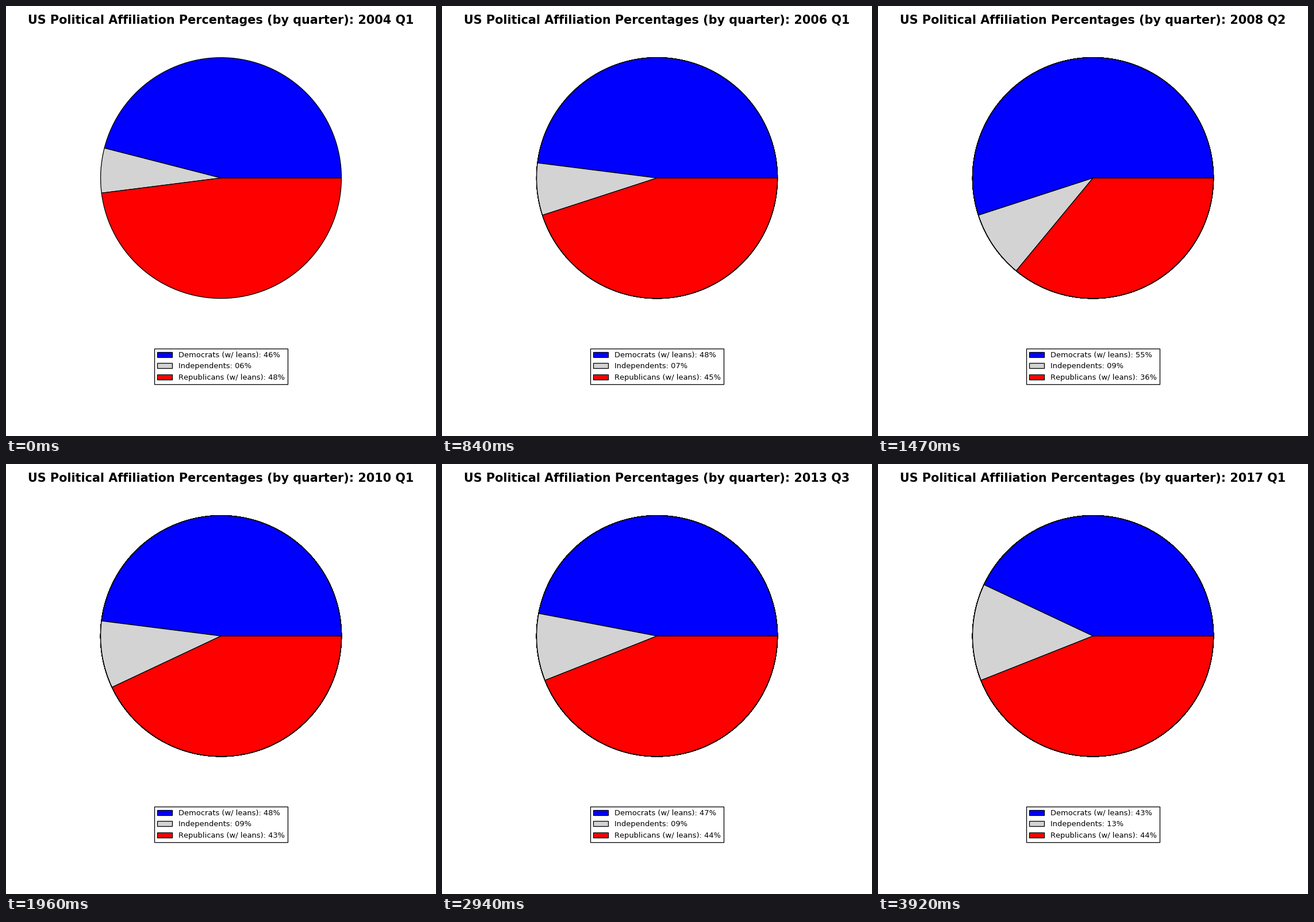
A matplotlib script that plays this animation: 748 px wide and 748 px high, repeating every 4.34 s.

```python
import numpy as np
import matplotlib.pyplot as plt
from matplotlib.animation import FuncAnimation
from matplotlib.patches import Patch

plt.rcParams["font.family"] = "DejaVu Sans"
plt.rcParams["text.kerning_factor"] = 6   # whole-pixel kerning

STEP_MS = 70
STEPS = 62
HOLD = 4         # extra steps spent on the first quarter
QUARTERS = 53
START_YEAR = 2004
COLORS = ["blue", "lightgray", "red"]
NAMES = ["Democrats (w/ leans)", "Independents", "Republicans (w/ leans)"]

# Turning points of the two large shares: quarter -> percent
TURNS = [0, 8, 11, 17, 21, 24, 31, 35, 44, 51, 52]
DEM = [46, 48, 53, 55, 53, 48, 43, 49, 43, 49, 43]
REP = [48, 45, 38, 36, 36, 43, 45, 44, 44, 42, 44]


def split(quarter):
    dem = round(np.interp(quarter, TURNS, DEM))
    rep = round(np.interp(quarter, TURNS, REP))
    return dem, 100 - dem - rep, rep


def labels(quarter):
    return [f"{name}: {share:02d}%"
            for name, share in zip(NAMES, split(quarter))]


def heading(quarter):
    year, part = START_YEAR + quarter // 4, quarter % 4 + 1
    return f"US Political Affiliation Percentages (by quarter): {year} Q{part}"


fig = plt.figure(figsize=(8, 8), dpi=93.5, facecolor="white")
ax = fig.add_axes([0.15, 0.25, 0.7, 0.7])
title = fig.suptitle(heading(0), fontsize=16, fontweight="bold")

# Each pie stays beneath the next one, so the rim slowly thickens.
edge = {"edgecolor": "black", "linewidth": 1}
pies = [ax.pie(split(q), colors=COLORS, wedgeprops=edge)[0]
        for q in range(QUARTERS)]

handles = [Patch(facecolor=color, label=label, **edge)
           for color, label in zip(COLORS, labels(0))]
legend = ax.legend(handles=handles, loc="lower center",
                   bbox_to_anchor=(0.5, -0.198), fontsize=10,
                   fancybox=False, edgecolor="black", framealpha=1)


def update(step):
    quarter = min(max(step - HOLD, 0), QUARTERS - 1)
    for q, wedges in enumerate(pies):
        for wedge in wedges:
            wedge.set_visible(q <= quarter)
    for text, label in zip(legend.get_texts(), labels(quarter)):
        text.set_text(label)
    title.set_text(heading(quarter))
    return []


anim = FuncAnimation(fig, update, frames=STEPS, interval=STEP_MS,
                     repeat=True, repeat_delay=0, blit=False)
plt.show()
```
